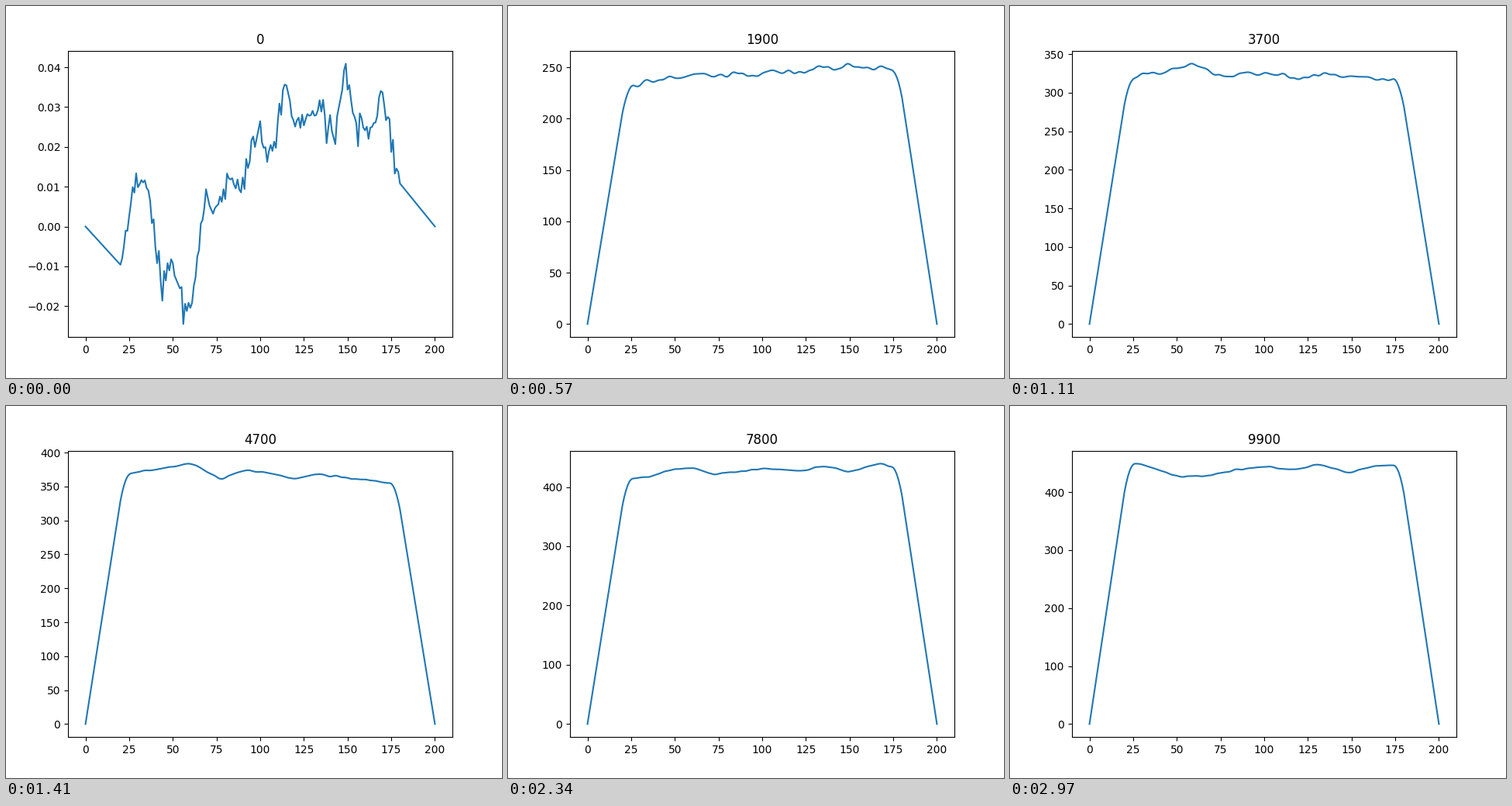
Animation, 640 px wide and 480 px high, one loop 3 s. Source, as a matplotlib script:

```python
import numpy as np
import matplotlib.pyplot as plt
from matplotlib.animation import FuncAnimation

FRAMES, INTERVAL, STEP = 100, 30, 100
GROWTH = 0.65  # heights rise roughly like steps ** GROWTH
SAG, EDGE = 0.11, 6  # depth and width of the rounded shoulders
X = np.arange(20, 181)
STATES = np.concatenate([[0], X, [200]])
SIDE = np.minimum(X - 20, 180 - X)

# Main bends of the first estimate, in thousandths
START = [(20, -10.8), (28, 11), (36, 9), (44, -18), (50, -7), (56, -24.5),
         (61, -18), (69, 7), (74, 2), (82, 12), (88, 9), (100, 24),
         (104, 16), (115, 37), (120, 26), (134, 31), (143, 23), (149, 41),
         (154, 27), (163, 25), (170, 34), (180, 10.8)]

# Main bends of the plateau at some training steps
BENDS = {
    1100: [(26, 183), (43, 191), (55, 182), (70, 194), (107, 204),
           (151, 214.4), (174, 210)],
    2700: [(26, 269), (58, 287.3), (68, 286), (74, 278), (126, 276),
           (139, 280), (174, 277)],
    4700: [(26, 369), (61, 383.6), (78, 360), (92, 375), (121, 361),
           (132, 368), (174, 355)],
    6100: [(26, 382), (56, 377), (80, 391), (94, 383), (116, 396),
           (132, 383), (150, 394), (163, 383), (174, 392)],
    7800: [(26, 413), (36, 416), (48, 429), (61, 430), (74, 420), (100, 430),
           (121, 426), (137, 434), (150, 424), (168, 439.4), (174, 432)],
    9900: [(28, 448.9), (52, 426), (64, 427), (97, 444), (118, 438),
           (130, 448), (149, 433), (163, 445), (174, 446)],
}

rng = np.random.default_rng(4)
WAVES = np.arange(6, 31)
PHASE = rng.uniform(0, 2 * np.pi, WAVES.size)
DRIFT = rng.uniform(-0.3, 0.3, WAVES.size)


def smooth(y, width=5):
    padded = np.pad(y, width // 2, mode="edge")
    return np.convolve(padded, np.ones(width) / width, "valid")


def first_estimate():
    xs, ys = np.array(START).T
    y = np.interp(X, xs, ys) + rng.normal(0, 2, X.size) * (SIDE > 0)
    return np.interp(y, (y.min(), y.max()), (-0.0245, 0.0409))


def plateau(points):
    xs, ys = np.array(points).T
    y = smooth(np.interp(X, xs, ys))
    y *= ys.max() / y.max()
    return y * (1 - SAG * np.clip(1 - SIDE / EDGE, 0, 1) ** 2)


PROFILES = [first_estimate()] + [plateau(p) for p in BENDS.values()]
PEAKS = [p.max() for p in PROFILES]
CLOCK = np.array([0, *BENDS]) ** GROWTH


def ripple(i):
    angle = 2 * np.pi * np.outer((X - 20) / 160, WAVES) + PHASE + DRIFT * i
    return np.clip(SIDE / 10, 0, 1) * (np.sin(angle) @ (1 / WAVES))


def values(i):
    n = i * STEP
    pos = np.interp(n ** GROWTH, CLOCK, np.arange(CLOCK.size))
    k = min(int(pos), CLOCK.size - 2)
    w = pos - k
    y = (1 - w) * PROFILES[k] + w * PROFILES[k + 1]
    y = y + min(n / 1100, 1) * (2 + 6 * np.sqrt(w * (1 - w))) * ripple(i)
    y *= ((1 - w) * PEAKS[k] + w * PEAKS[k + 1]) / y.max()
    return np.concatenate([[0], y, [0]])


fig, ax = plt.subplots(figsize=(6.4, 4.8), dpi=100)


def update(i):
    ax.clear()
    ax.plot(STATES, values(i))
    ax.set_title(str(i * STEP))


anim = FuncAnimation(fig, update, frames=FRAMES, interval=INTERVAL,
                     repeat=True, repeat_delay=0)
plt.show()
```
